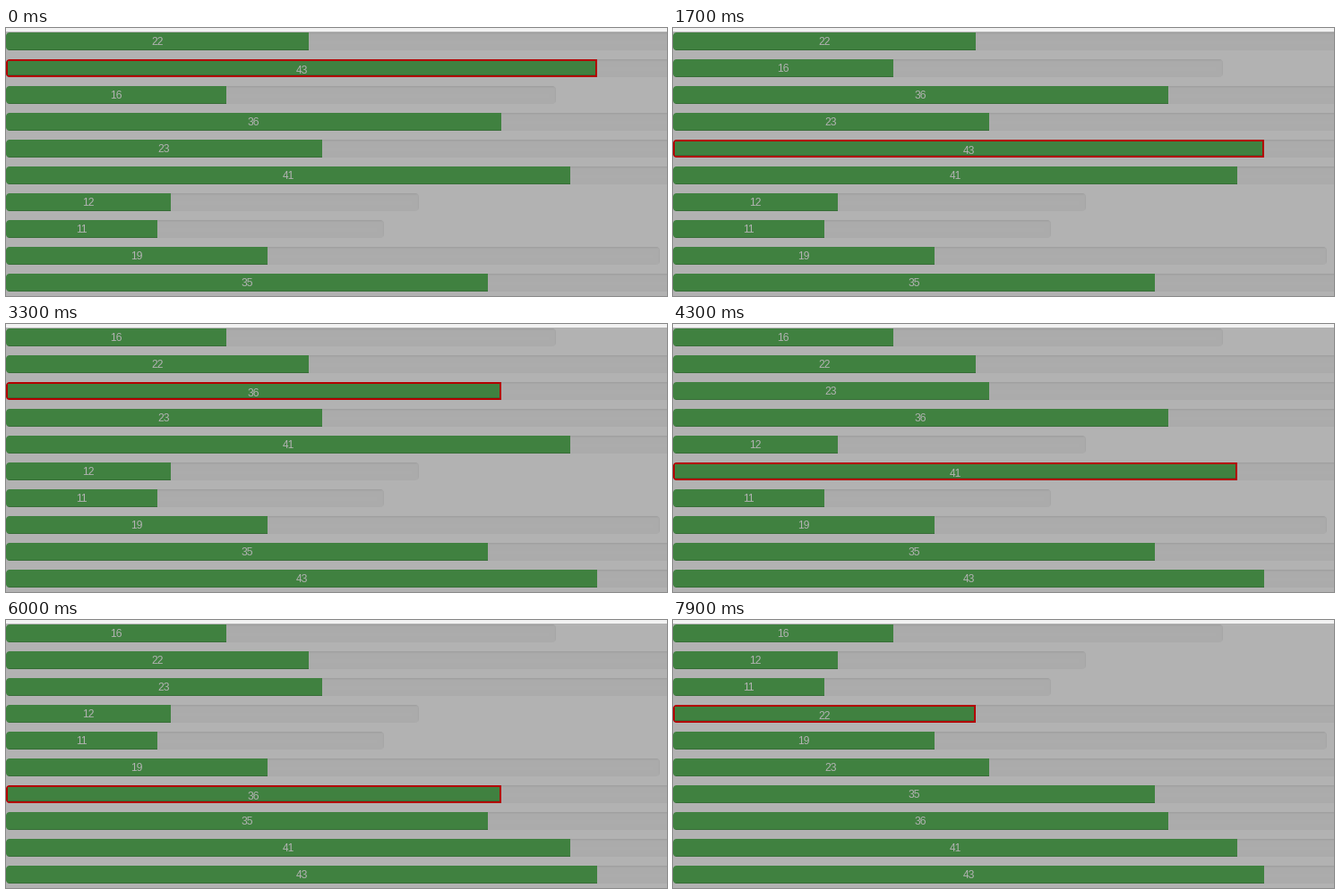
These frames come from a looping animation (738 px wide and 300 px high, 8 s). A matplotlib script:

```python
import math

import matplotlib.pyplot as plt
import numpy as np
from matplotlib.animation import FuncAnimation

W, H, DPI = 738, 300, 64
BAR_H, PITCH, TOP, RADIUS = 20, 30, 5, 4
UNIT = 15.36            # filled pixels per unit of value
TRACK_RATIO = 2.5       # track length relative to the fill
BORDER = 2
TICK, LOOP = 100, 8000

DIM = 0.7               # a dark veil lies over the page
PAGE = np.array([255, 255, 255]) * DIM
TRACK = np.array([245, 245, 245]) * DIM
GREEN = np.array([92, 184, 92]) * DIM
RED = np.array([255, 0, 0]) * DIM
STRIP = 242

VALUES = [22, 43, 16, 36, 23, 41, 12, 11, 19, 35]
STARTS = [0, 900, 1300, 1700, 2000, 2300, 2600, 2800, 3100, 3300, 3700, 4300,
          4700, 5000, 5200, 5400, 5600, 6000, 6200, 6600, 6900, 7200, 7600, 7900]


def bubble_steps(values):
    """Yield the order and the row about to be swapped."""
    row = list(values)
    for end in range(len(row) - 1, 0, -1):
        for j in range(end):
            if row[j] > row[j + 1]:
                yield tuple(row), j
                row[j], row[j + 1] = row[j + 1], row[j]


def soft_step(x):
    return np.array([0.5 * (1 + math.erf(v / math.sqrt(2))) for v in x])


def rounded_mask(width):
    x = np.arange(W) + 0.5
    y = np.arange(BAR_H)[:, None] + 0.5
    qx = np.abs(x - width / 2) - width / 2 + RADIUS
    qy = np.abs(y - BAR_H / 2) - BAR_H / 2 + RADIUS
    outside = np.hypot(np.maximum(qx, 0), np.maximum(qy, 0))
    dist = outside + np.minimum(np.maximum(qx, qy), 0) - RADIUS
    return np.clip(0.5 - dist, 0, 1)[..., None]


def inset_shadow(width):
    x = np.arange(W) + 0.5
    y = np.arange(BAR_H) + 0.5
    lit_x = soft_step(x) * soft_step(width - x)
    lit_y = soft_step(y - 1) * soft_step(BAR_H + 1 - y)
    return 0.1 * (1 - np.outer(lit_y, lit_x))[..., None]


def paint_bar(value, active):
    fill = round(value * UNIT)
    width = round(value * UNIT * TRACK_RATIO)
    bar = TRACK * (1 - inset_shadow(width))
    b = BORDER if active else 0
    if active:
        bar[:, :fill] = RED
    bar[b:BAR_H - b, b:fill - b] = GREEN
    bar[BAR_H - b - 1, b:fill - b] = GREEN * 0.85
    mask = rounded_mask(width)
    return PAGE * (1 - mask) + bar * mask


steps = list(bubble_steps(VALUES))
bars = {(v, a): paint_bar(v, a) for v in VALUES for a in (False, True)}


def paint_stage(order, current):
    stage = np.empty((H, W, 3))
    stage[:] = PAGE
    stage[:4] = STRIP
    for i, v in enumerate(order):
        y = TOP + i * PITCH
        stage[y:y + BAR_H] = bars[v, i == current]
    return np.rint(stage).astype(np.uint8)


fig = plt.figure(figsize=(W / DPI, H / DPI), dpi=DPI)
ax = fig.add_axes([0, 0, 1, 1])
ax.axis("off")
picture = ax.imshow(paint_stage(*steps[0]), extent=(0, W, H, 0),
                    interpolation="nearest", aspect="auto")
labels = [ax.text(0, 0, "", ha="center", va="baseline", color=PAGE / 255,
                  family="Liberation Sans", size=12 * 72 / DPI)
          for _ in VALUES]


def update(frame):
    step = np.searchsorted(STARTS, frame * TICK, side="right") - 1
    order, current = steps[step]
    picture.set_data(paint_stage(order, current))
    for i, (v, label) in enumerate(zip(order, labels)):
        drop = BORDER if i == current else 0
        label.set_text(str(v))
        label.set_position((round(v * UNIT) / 2, TOP + i * PITCH + 14 + drop))
    return [picture, *labels]


anim = FuncAnimation(fig, update, frames=LOOP // TICK, interval=TICK,
                     repeat=True, repeat_delay=0, blit=False)
plt.show()
```
